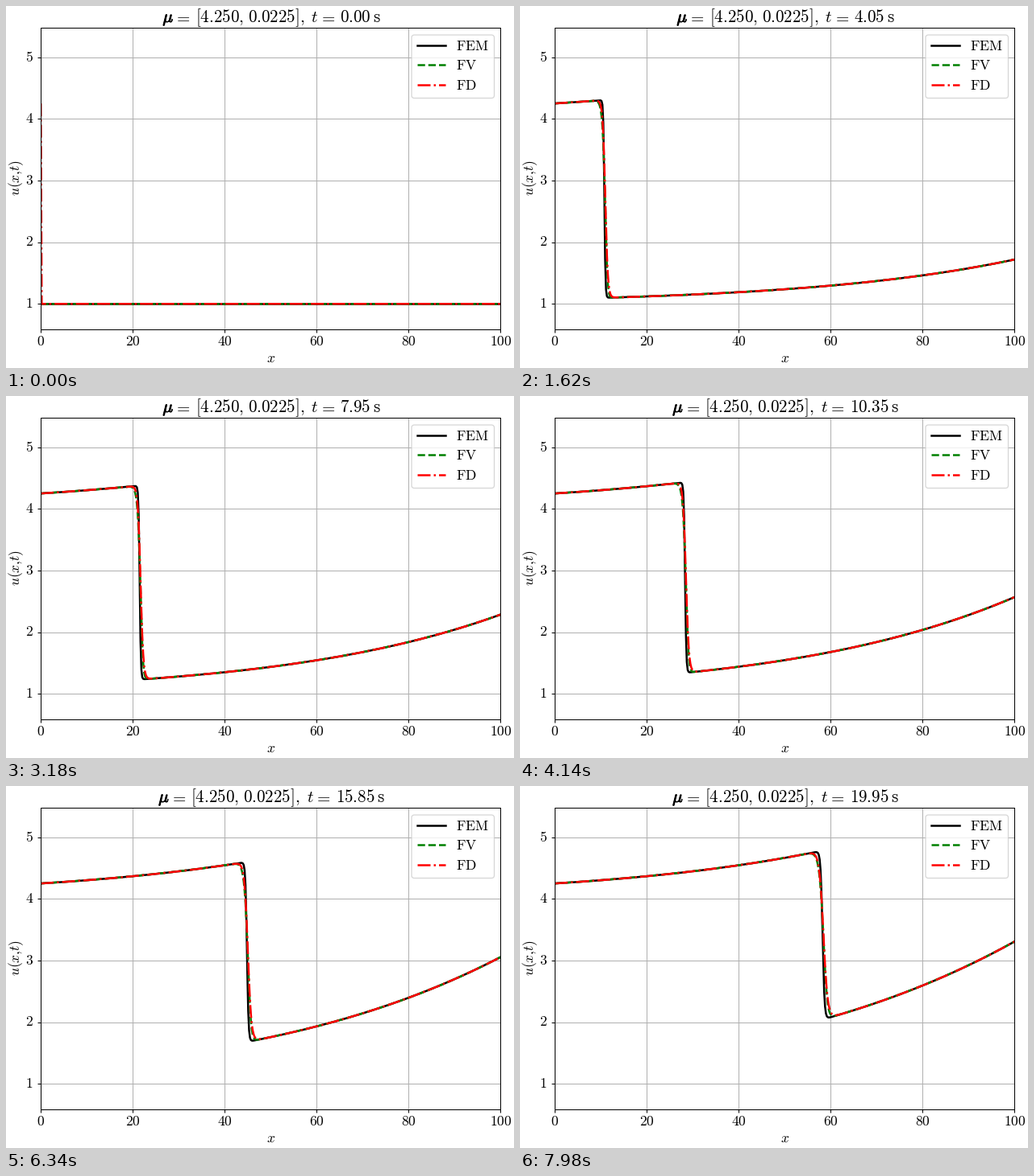
Recreate the animation shown at these times as a matplotlib script. Size 630 by 450 pixels, loop 8000 ms.

```python
import math

import numpy as np
import matplotlib.pyplot as plt
from matplotlib.animation import FuncAnimation
from matplotlib.lines import Line2D
from matplotlib.patches import FancyBboxPatch
from matplotlib.patheffects import withStroke
from matplotlib.transforms import Affine2D

plt.rcParams["mathtext.fontset"] = "cm"

W, H, DPI = 630, 450, 90
FRAMES, DT = 400, 0.05
LENGTH, CELLS = 100.0, 512
INFLOW, RATE = 4.25, 0.0225
DX = LENGTH / CELLS
EM, TITLE_EM = 17.5, 21.0
STYLES = [("FEM", "black", "-"), ("FV", "green", "--"), ("FD", "red", "-.")]

x = np.linspace(0, LENGTH, CELLS + 1)


def source(pos):
    return 0.02 * np.exp(RATE * pos)


def solve_upwind():
    """Implicit Euler with Godunov fluxes, marched cell by cell."""
    c = DT / (2 * DX)
    gain = (DT * source(x[1:])).tolist()
    u = [1.0] * CELLS
    states = [[1.0] + u]
    for _ in range(FRAMES - 1):
        left, new = INFLOW, []
        for old, g in zip(u, gain):
            q = old + g + c * left * left
            left = (math.sqrt(1 + 4 * c * q) - 1) / (2 * c)
            new.append(left)
        u = new
        states.append([INFLOW] + u)
    return np.array(states)


def left_state(pos):
    return np.sqrt(INFLOW**2 + 0.04 / RATE * (np.exp(RATE * pos) - 1))


def solve_layer(start, mesh, lag):
    """Characteristics joined by a viscous shock layer.

    start: inlet value at t = 0, mesh: cell size adding viscosity,
    lag: offset of the plotted layer.
    """
    pos, vel = x.copy(), np.ones_like(x)
    shock = 0.0
    behind = left_state(x)
    first = np.ones_like(x)
    first[0] = start
    states = [first]
    for _ in range(FRAMES - 1):
        speed = (left_state(shock) + np.interp(shock, pos, vel)) / 2
        shock += DT * speed
        pos = pos + DT * vel / 2
        vel = vel + DT * source(pos)
        pos = pos + DT * vel / 2
        ahead = np.interp(x, pos, vel)
        jump = left_state(shock) - np.interp(shock, pos, vel)
        viscosity = speed * (speed * DT + mesh) / 2
        z = (x - shock - lag) * jump / (4 * viscosity)
        u = ahead + (behind - ahead) * (1 - np.tanh(z)) / 2
        u[0] = INFLOW
        states.append(u)
    return np.array(states)


solutions = [solve_layer(1.0, 0.0, 0.0), solve_upwind(),
             solve_layer(INFLOW, DX, DX)]

fig = plt.figure(figsize=(W / DPI, H / DPI), dpi=DPI, facecolor="white")
# Pixel coordinates with the origin at the top left
px = Affine2D().scale(1 / W, -1 / H).translate(0, 1) + fig.transFigure


def label(px_x, px_y, s, em=EM, **kw):
    return fig.text(px_x, px_y, f"${s}$", transform=px, va="baseline",
                    fontsize=em * 72 / DPI, **kw)


ax = fig.add_axes([43.2 / W, 47.6 / H, 570 / W, 375 / H])
ax.set(xlim=(0, LENGTH), ylim=(0.581, 5.473),
       xticks=range(0, 101, 20), yticks=range(1, 6))
ax.tick_params(labelbottom=False, labelleft=False)
ax.grid(True)
curves = [ax.plot([], [], color=c, ls=ls, lw=2)[0] for _, c, ls in STYLES]

for v in range(0, 101, 20):
    label(43.5 + 5.7 * v, 422, v, ha="center")
for v in range(1, 6):
    label(24.5, 375 - 76.53 * (v - 1), v, ha="left")
label(328.5, 443, "x", ha="center")
label(17.5, 213.5, "u(x{,}t)", ha="center", rotation=90,
      rotation_mode="anchor")

# Legend
fig.add_artist(FancyBboxPatch(
    (503, 36), 102.5, 78.5, boxstyle="round,pad=0,rounding_size=3.5",
    transform=px, fc="white", ec="0.8", lw=1, alpha=0.8))
for row, (name, color, ls) in enumerate(STYLES):
    y = 49 + 24.4 * row
    fig.add_artist(Line2D([510, 545], [y, y], transform=px,
                          color=color, ls=ls, lw=2))
    label(558, y + 6, rf"\mathrm{{{name}}}", ha="left")

# Title pieces with their offsets in em
PIECES = [(0.11, r"\mu"), (0.78, "="), (2.03, "[4.250,"), (5.12, "0.0225],"),
          (8.87, "t"), (9.31, "="), (10.56, "0.00"), (12.51, r"\mathrm{s}")]
title = [label(0, 20, s, TITLE_EM, ha="left") for _, s in PIECES]
title[0].set_path_effects([withStroke(linewidth=0.75, foreground="black")])
clock, unit = title[-2:]


def draw(i):
    wide = 0.5 if i >= 200 else 0.0
    start = 328.5 - (12.9 + wide) * TITLE_EM / 2
    for part, (offset, _) in zip(title, PIECES):
        shift = wide if part is unit else 0
        part.set_x(start + (offset + shift) * TITLE_EM - 1)
    clock.set_text(f"${i * DT:.2f}$")
    for curve, states in zip(curves, solutions):
        curve.set_data(x, states[i])
    return curves + title


anim = FuncAnimation(fig, draw, frames=FRAMES, interval=20, repeat=True,
                     repeat_delay=0, blit=False)
plt.show()
```
